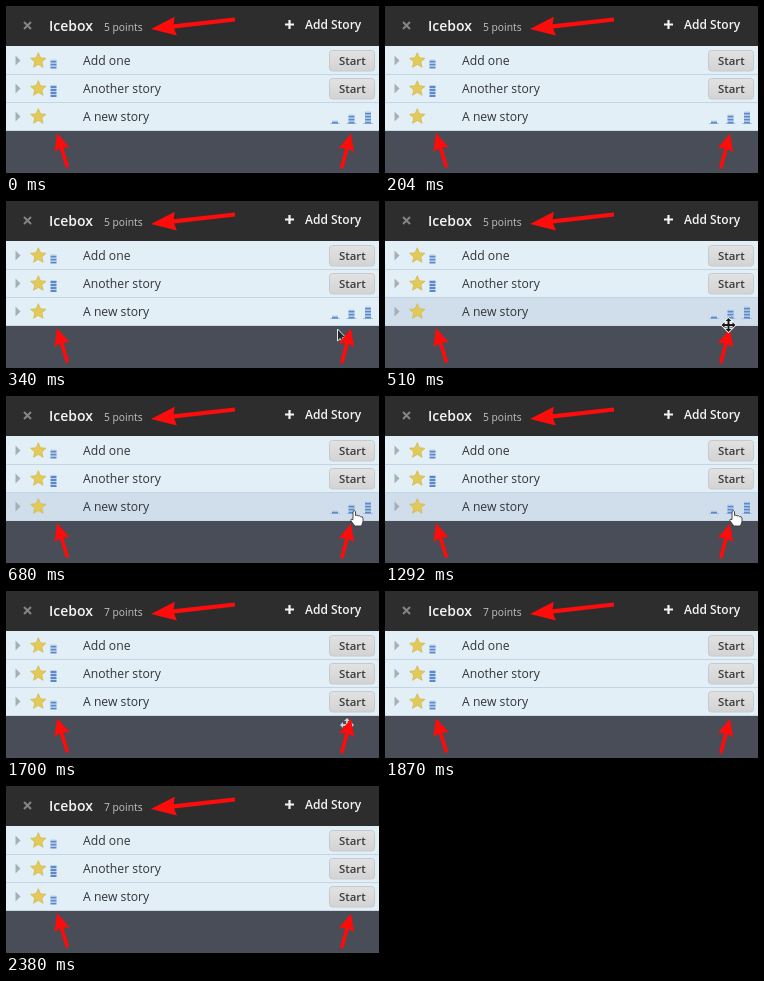
Animation, 373 px wide and 167 px high, one loop 2720 ms. Source, as an HTML page:

```html
<!DOCTYPE html>
<html lang="en">
<head>
<meta charset="utf-8">
<title>Icebox</title>
<style>
  html, body { margin: 0; width: 100%; height: 100%; overflow: hidden; background: #484d57; }
  svg { display: block; width: 100%; height: 100%; }
  text { font-family: "Open Sans", "Noto Sans", sans-serif; }
  .title { font-size: 14px; font-weight: 600; fill: #f4f4f4; }
  .count { font-size: 10.3px; fill: #c4c4c4; }
  .add { font-size: 12px; font-weight: 600; fill: #f4f4f4; }
  .story { font-size: 12.2px; fill: #303438; }
  .start { font-size: 11.4px; font-weight: 600; fill: #3b3b3b; text-anchor: middle; }

  .before, .after, .hover, .pointer, .move, .hand, .ghost {
    animation: 2720ms step-end infinite;
  }
  .before { animation-name: before; }
  .after { animation-name: after; }
  .hover { animation-name: hover; }
  .pointer { animation-name: pointer; }
  .move { animation-name: move; }
  .hand { animation-name: hand; }
  .ghost { animation-name: ghost; }

  @keyframes before { 0% { visibility: visible } 62.5%, 100% { visibility: hidden } }
  @keyframes after { 0% { visibility: hidden } 62.5%, 100% { visibility: visible } }
  @keyframes hover { 0% { visibility: hidden } 18.75% { visibility: visible } 62.5%, 100% { visibility: hidden } }
  @keyframes pointer { 0% { visibility: hidden } 12.5% { visibility: visible } 18.75%, 100% { visibility: hidden } }
  @keyframes move { 0% { visibility: hidden } 18.75% { visibility: visible } 25%, 100% { visibility: hidden } }
  @keyframes hand { 0% { visibility: hidden } 25% { visibility: visible } 62.5%, 100% { visibility: hidden } }
  @keyframes ghost { 0% { visibility: hidden } 62.5% { visibility: visible } 68.75%, 100% { visibility: hidden } }
</style>
</head>
<body>
<svg viewBox="0 0 373 167" preserveAspectRatio="none">
  <defs>
    <linearGradient id="buttonFill" x2="0" y2="1">
      <stop stop-color="#e2e2e2"/>
      <stop offset="1" stop-color="#d3d3d3"/>
    </linearGradient>
    <g id="marks">
      <path d="M9.5 9.5 L14.5 14.5 L9.5 19.5Z" fill="#a5afb5"/>
      <path d="M32.3 6.7 L34.5 11.8 L40 12.3 L35.8 15.9 L37.1 21.3 L32.3 18.4 L27.5 21.3 L28.8 15.9 L24.6 12.3 L30.1 11.8Z"
        fill="#e3ca58" stroke="#d2b957" stroke-width=".8" stroke-linejoin="round"/>
    </g>
    <g id="start">
      <rect x="323.5" y="4.5" width="45" height="20.5" rx="3" fill="url(#buttonFill)" stroke="#c6cacd"/>
      <text class="start" x="346.3" y="18.6">Start</text>
    </g>
    <!-- Point icons grow upwards from their base line -->
    <g id="bar">
      <rect y="-2" width="6" height="2" fill="#5b89cc"/>
      <rect y="-3" width="6" height="1" fill="#bed2ec"/>
    </g>
    <g id="two">
      <use href="#bar"/><use href="#bar" y="-3"/><use href="#bar" y="-6"/>
    </g>
    <g id="three">
      <use href="#two"/><use href="#bar" y="-9"/>
    </g>
    <path id="arrow" d="M0 0 L25 -9.5 L23 -2.2 L84.5 -2 L84.5 2 L23 2.2 L25 9.5Z"/>
    <path id="shortArrow" d="M0 0 L17.5 -8 L15.5 -1.9 L36 -1.8 L36 1.8 L15.5 1.9 L17.5 8Z"/>
    <path id="cross" d="M0 -7 L3 -4 H1 V-1 H4 V-3 L7 0 L4 3 V1 H1 V4 H3 L0 7 L-3 4 H-1 V1 H-4 V3 L-7 0 L-4 -3 V-1 H-1 V-4 H-3Z"/>
  </defs>

  <rect width="373" height="167" fill="#484d57"/>
  <rect width="373" height="40" fill="#2d2d2d"/>
  <path d="M18 16 L25 23 M25 16 L18 23" stroke="#858585" stroke-width="2"/>
  <text class="title" x="43" y="24.5">Icebox</text>
  <text class="count before" x="98" y="24.5">5 points</text>
  <text class="count after" x="98" y="24.5">7 points</text>
  <path d="M279 18.5 H288 M283.5 14 V23" stroke="#f4f4f4" stroke-width="2.2"/>
  <text class="add" x="299" y="23">Add Story</text>

  <rect y="40" width="373" height="85" fill="#e2eff7"/>
  <rect class="hover" y="97" width="373" height="28" fill="#cfdeea"/>
  <path d="M0 68.5 H373 M0 96.5 H373" stroke="#c3d4e4"/>
  <path d="M0 124.5 H373" stroke="#cbd8e3"/>

  <g transform="translate(0 40)">
    <use href="#marks"/>
    <use href="#two" x="44.5" y="22.5"/>
    <text class="story" x="77" y="18.5">Add one</text>
    <use href="#start"/>
  </g>
  <g transform="translate(0 68)">
    <use href="#marks"/>
    <use href="#three" x="44.5" y="23"/>
    <text class="story" x="77" y="18.5">Another story</text>
    <use href="#start"/>
  </g>
  <g transform="translate(0 96)">
    <use href="#marks"/>
    <text class="story" x="77" y="18.5">A new story</text>
    <g class="before">
      <path d="M324 21.5 H334 M340.5 21.5 H350.5 M357 21.5 H367" stroke="#a9c2e2"/>
      <use href="#bar" x="326" y="21.5"/>
      <use href="#two" x="342.5" y="21.5"/>
      <use href="#three" x="359" y="21.5"/>
    </g>
    <g class="after">
      <use href="#two" x="44.5" y="22.5"/>
      <use href="#start"/>
    </g>
  </g>

  <path class="pointer" d="M331.5 128 V140 L334.3 137.5 L336.3 141.5 L338.4 140.5 L336.5 136.7 H340Z"
    fill="#25282d" stroke="#e4e6e8"/>
  <use class="ghost" href="#cross" transform="translate(341 134)" fill="#eceef0" opacity=".8"/>

  <g fill="#fe0b0b">
    <use href="#arrow" transform="translate(145 23) rotate(-6.5)"/>
    <use href="#shortArrow" transform="translate(51 127) rotate(73)"/>
    <use href="#shortArrow" transform="translate(345 127.5) rotate(105)"/>
  </g>

  <use class="move" href="#cross" transform="translate(343.5 124)"
    fill="#16181b" stroke="#fff" stroke-width="1.6" paint-order="stroke"/>
  <path class="hand" d="M347 115.5 Q348.3 113.8 349.5 115.5 V119.5 Q351 118.5 352 120 Q353.5 119 354.5 120.7 Q357 120 357 122.5 V125.5 L355.5 130 H348.8 L344.8 124.5 Q344.5 122.5 347 123.5Z"
    fill="#fff" stroke="#35383d" stroke-width=".9" stroke-linejoin="round"/>
</svg>
</body>
</html>
```
